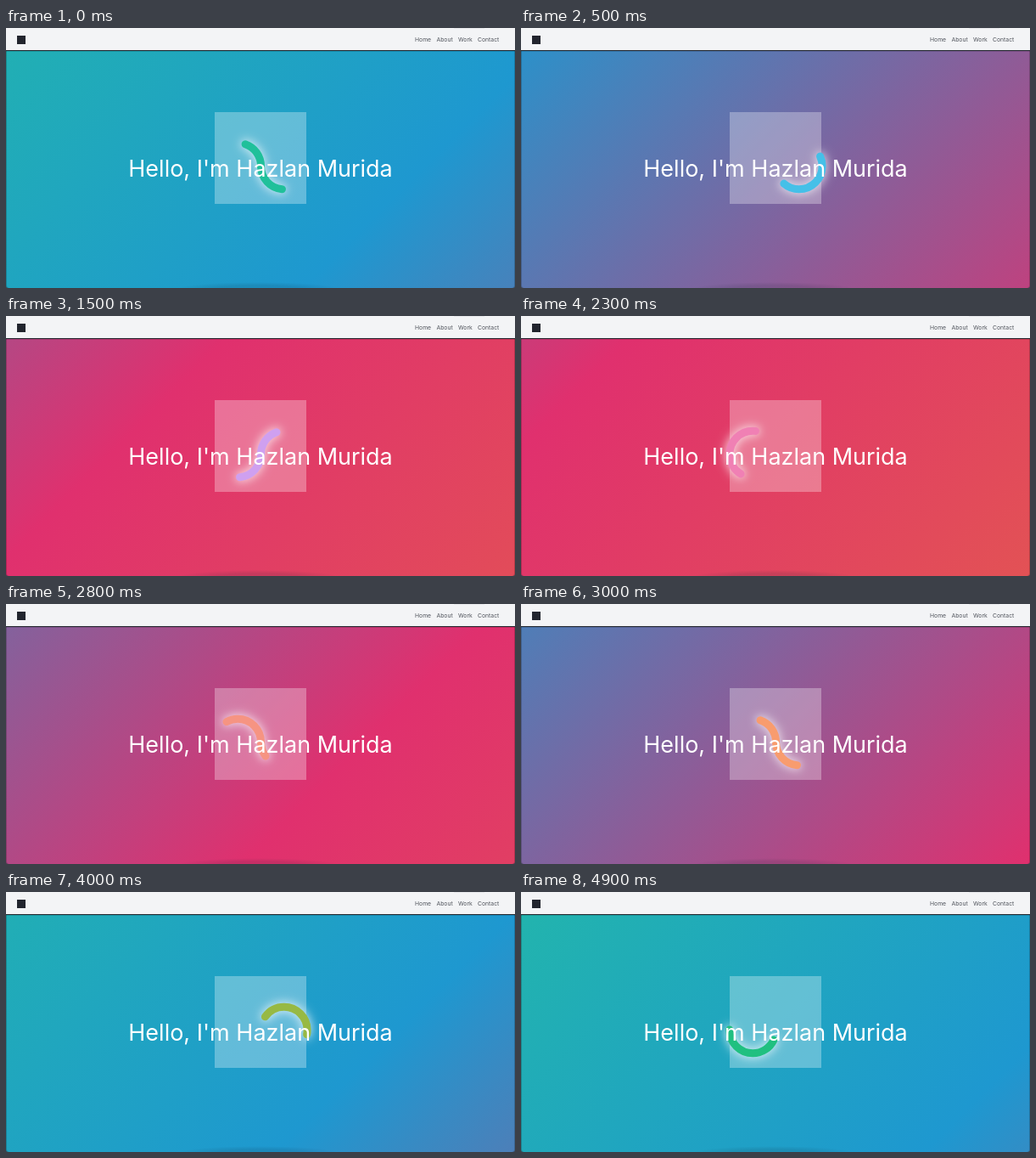
Recreate the animation shown at these times as an HTML page. Size 600x306 px, loop 5000 ms.

```html
<!DOCTYPE html>
<html lang="en">
<head>
<meta charset="utf-8">
<title>Hello</title>
<style>
  html, body { margin: 0; width: 100%; height: 100%; overflow: hidden; background: #3c4450; }
  #hero {
    position: absolute; left: 0; top: 27px; width: 600px; height: 279px;
    border-radius: 0 0 3px 3px;
    box-shadow: inset 1px 0 rgba(0, 0, 0, .2), inset -1px 0 rgba(0, 0, 0, .2);
    background: linear-gradient(-45deg, #e46547, #e0306e, #1e98d0, #24c39b) 0 50% / 400% 400%;
  }
  svg { position: absolute; left: 0; top: 0; font-family: Inter, "Open Sans", sans-serif; }
  #snake {
    fill: none; stroke-width: 9; stroke-linecap: round; stroke-dasharray: 156 564;
    filter: drop-shadow(0 0 5px rgba(255, 255, 255, .5)) drop-shadow(0 0 7px rgba(255, 255, 255, .45));
  }
</style>
</head>
<body>
<div id="hero"></div>
<svg width="600" height="306" viewBox="0 0 600 306">
  <defs>
    <linearGradient id="shade" x2="0" y2="1">
      <stop stop-color="#000" stop-opacity=".5"/>
      <stop offset="1" stop-color="#000" stop-opacity="0"/>
    </linearGradient>
    <radialGradient id="dock">
      <stop offset=".5" stop-color="#123" stop-opacity=".13"/>
      <stop offset="1" stop-color="#123" stop-opacity="0"/>
    </radialGradient>
  </defs>
  <ellipse cx="297" cy="307" rx="95" ry="8" fill="url(#dock)"/>
  <rect x="246" y="99" width="108" height="108" fill="#fff" fill-opacity=".3"/>
  <path id="snake" pathLength="720" d="M300.5 162.5a27.3 27.3 0 0 0 54.6 0a27.3 27.3 0 0 0 -54.6 0a27.3 27.3 0 0 1 -54.6 0a27.3 27.3 0 0 1 54.6 0"/>
  <text x="300" y="175" font-size="27" text-anchor="middle" fill="#fff">Hello, I'm Hazlan Murida</text>

  <rect y="26" width="600" height="2" fill="url(#shade)"/>
  <rect width="600" height="26" fill="#f3f4f6"/>
  <rect x="528" width="36" height="1" fill="#e6e7ea"/>
  <rect x="13" y="9" width="10" height="10" fill="#22252e"/>
  <g font-size="6.8" fill="#50545c">
    <text x="482" y="15.6">Home</text>
    <text x="507.5" y="15.6">About</text>
    <text x="533" y="15.6">Work</text>
    <text x="556" y="15.6">Contact</text>
  </g>
</svg>
<script>
const LOOP = 5000, STEP = 100;
const SWEEP = 2560, LEAD = 210; // one pass of the background, and how far in it begins
const hero = document.getElementById('hero');
const snake = document.getElementById('snake');

// time, red, green, blue
const hues = [
  [0, 32, 192, 154], [500, 69, 192, 232], [1500, 207, 160, 240],
  [2300, 240, 128, 180], [3000, 248, 156, 110], [3400, 216, 167, 82],
  [4100, 140, 188, 66], [4900, 32, 192, 128], [5000, 32, 192, 154]
];

// cubic-bezier(.25, .1, .25, 1)
function ease(x) {
  const curve = (a, b, u) => 3 * a * u * (1 - u) ** 2 + 3 * b * u * u * (1 - u) + u ** 3;
  let lo = 0, hi = 1;
  for (let i = 0; i < 24; i++) {
    const mid = (lo + hi) / 2;
    if (curve(.25, .25, mid) < x) lo = mid; else hi = mid;
  }
  return curve(.1, 1, lo);
}

function colorAt(t) {
  const i = hues.findIndex(h => h[0] > t);
  const a = hues[i - 1], b = hues[i];
  const k = (t - a[0]) / (b[0] - a[0]);
  return `rgb(${[1, 2, 3].map(c => a[c] + (b[c] - a[c]) * k)})`;
}

function draw(now) {
  const t = Math.floor(now % LOOP / STEP) * STEP;
  const phase = (t + LEAD) / SWEEP;
  const shift = phase < 1 ? ease(phase) : 1 - ease(phase - 1);
  hero.style.backgroundPosition = `${shift * 100}% 50%`;
  snake.style.strokeDashoffset = 71 - .24 * t;
  snake.style.stroke = colorAt(t);
}

const start = performance.now();
function tick() {
  draw(performance.now() - start);
  requestAnimationFrame(tick);
}
tick();
</script>
</body>
</html>
```
